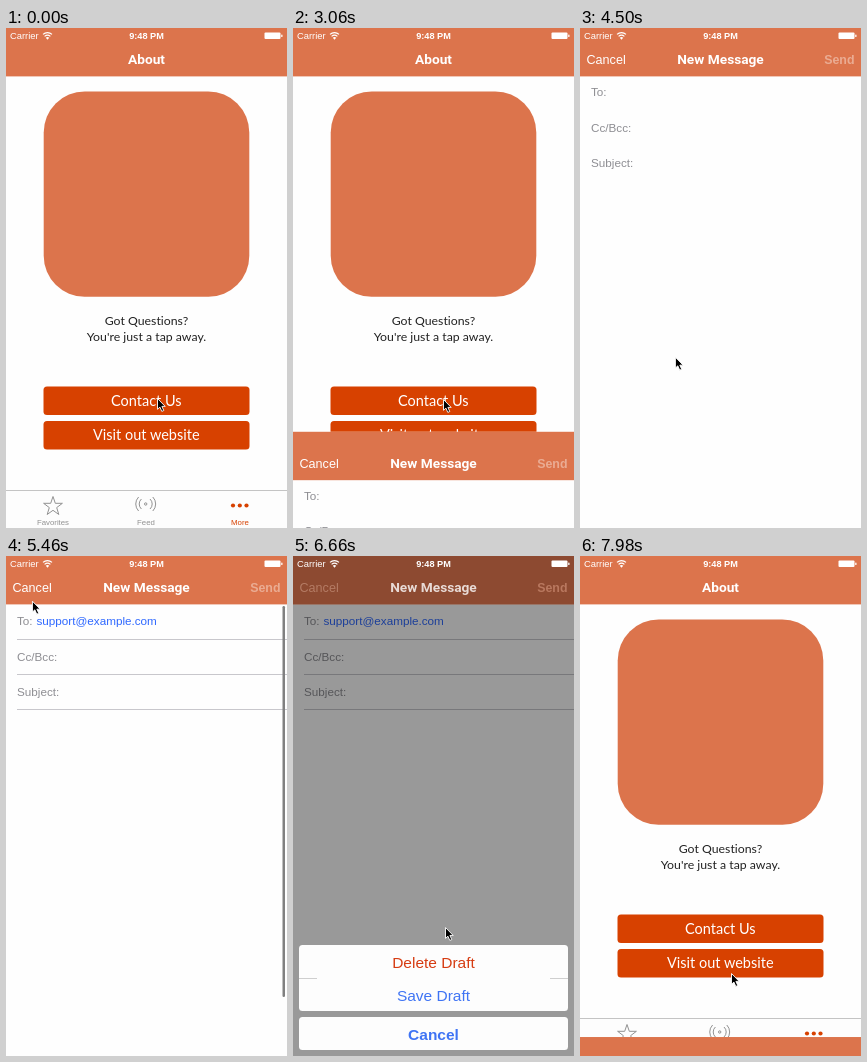
Animation, 281 px wide and 500 px high, one loop 8000 ms. Source, as an HTML page:

```html
<!DOCTYPE html>
<html lang="en">
<head>
<meta charset="utf-8">
<title>About</title>
<style>
html, body { margin: 0; width: 100%; height: 100%; overflow: hidden; background: #fff; }
svg { display: block; width: 100%; height: 100%; }
text { font-family: "Liberation Sans", Arial, sans-serif; font-variant-ligatures: none; }
.mid { text-anchor: middle; }
.title { font: bold 13.7px Roboto, sans-serif; fill: #fff; }
.copy { font: 12.3px Lato, sans-serif; fill: #222; }
.btn { font: 14.5px Lato, sans-serif; fill: #fff; }
.copy, .btn { font-variant-ligatures: none; }
.tab { font-size: 7.8px; fill: #929292; }
.field { font-size: 11.7px; fill: #8e8e93; }
.item { font-size: 15.5px; fill: #3f74f4; }
.icon { fill: none; stroke: #929292; }
</style>
</head>
<body>
<svg viewBox="0 0 281 500">
  <rect width="281" height="500" fill="#fefefe"/>

  <g id="about">
    <rect width="281" height="48.4" fill="#dc744c"/>
    <text class="title mid" x="140.5" y="36">About</text>
    <rect x="37.7" y="63.4" width="205.6" height="205.4" rx="41" fill="#dc744c"/>
    <text class="copy mid" x="140.5" y="297">Got Questions?</text>
    <text class="copy mid" x="140.5" y="313">You're just a tap away.</text>
    <g fill="#d74100">
      <rect x="37.5" y="358.5" width="206" height="28.6" rx="3.5"/>
      <rect x="37.5" y="393" width="206" height="28.6" rx="3.5"/>
    </g>
    <text id="contact" class="btn mid" x="140.3" y="378">Contact Us</text>
    <text class="btn mid" x="140.3" y="412">Visit out website</text>

    <rect y="462" width="281" height="38" fill="#fdfdfd"/>
    <path d="M0 462.5h281" stroke="#c4c4c4"/>
    <path class="icon" d="M47 468.5l2.3 6.8h7.1l-5.7 4.3 2.1 6.9-5.8-4.2-5.8 4.2 2.1-6.9-5.7-4.3h7.1z"/>
    <g class="icon">
      <circle cx="139.7" cy="476" r="1.2"/>
      <path d="M135.4 471a6.8 6.8 0 0 0 0 10M144 471a6.8 6.8 0 0 1 0 10M132.6 469a10 10 0 0 0 0 14M146.8 469a10 10 0 0 1 0 14"/>
    </g>
    <g fill="#d74100">
      <circle cx="227" cy="477.5" r="2.1"/>
      <circle cx="233.8" cy="477.5" r="2.1"/>
      <circle cx="240.5" cy="477.5" r="2.1"/>
    </g>
    <text class="tab mid" x="47" y="497.4">Favorites</text>
    <text class="tab mid" x="140" y="497.4">Feed</text>
    <text class="tab mid" x="234" y="497.4" style="fill:#d74100">More</text>
  </g>

  <g id="mail">
    <rect width="281" height="500" fill="#fefefe"/>
    <g id="fields">
      <text class="field" x="11" y="68">To:</text>
      <text class="field" x="11" y="103.5">Cc/Bcc:</text>
      <text class="field" x="11" y="138.5">Subject:</text>
    </g>
    <g id="loaded">
      <text class="field" x="30.5" y="69" style="fill:#2e68ff">support@example.com</text>
      <path d="M11 83.5h270M11 118.5h270M11 153.5h270" stroke="#c8c7cc"/>
      <rect id="bar" x="276.5" y="50" width="2.5" height="391" rx="1.2" fill="#808080"/>
    </g>
    <rect id="dim" y="48" width="281" height="452"/>
    <rect width="281" height="48.4" fill="#dc744c"/>
    <rect id="navDim" width="281" height="48.4"/>
    <text id="cancel" x="6.5" y="36" font-size="12.6">Cancel</text>
    <text id="title" class="title mid" x="140.5" y="36">New Message</text>
    <text id="send" x="274.5" y="36" font-size="12.4" font-weight="bold" text-anchor="end">Send</text>
  </g>

  <g id="sheet">
    <g fill="#fdfdfd">
      <rect x="6" y="389" width="269" height="66" rx="3.5"/>
      <rect x="6" y="461" width="269" height="33" rx="3.5"/>
    </g>
    <path d="M6 422.5h18M257 422.5h18" stroke="#cfcfcf"/>
    <text class="item mid" x="140.5" y="411.5" style="fill:#d63c12">Delete Draft</text>
    <text class="item mid" x="140.5" y="444.5">Save Draft</text>
    <text class="item mid" x="140.5" y="483.5" font-weight="bold">Cancel</text>
  </g>

  <g id="status" fill="#fff">
    <text x="4" y="11" font-size="9.4">Carrier</text>
    <path d="M41.5 11.8l-1.7-2a2.6 2.6 0 0 1 3.4 0z"/>
    <path d="M38.6 8.4a4.4 4.4 0 0 1 5.8 0M37 6.4a6.8 6.8 0 0 1 9 0" fill="none" stroke="#fff" stroke-width="1.2"/>
    <text class="mid" x="140.5" y="11" font-size="9.2" font-weight="bold">9:48 PM</text>
    <rect x="258.5" y="4.5" width="16" height="6.5" rx="1"/>
    <rect x="275.2" y="6.5" width="1.3" height="2.5" rx=".6"/>
  </g>

  <path id="cursor" d="M.5.5v10.8l2.4-2.2 1.9 4.3 2-.9-1.9-4.1h3.3z" stroke="#fff" stroke-width=".9"/>
</svg>
<script>
const LOOP = 8000;
const el = id => document.getElementById(id);
const set = (id, name, value) => el(id).setAttribute(name, value);
const clamp = v => Math.max(0, Math.min(1, v));
const ramp = (t, from, to) => clamp((t - from) / (to - from));

// Critically damped spring from 0 to 1, starting at a given time
function spring(t, start, rate = 18.26) {
  const x = Math.max(0, t - start) / 1000 * rate;
  return 1 - (1 + x) * Math.exp(-x);
}

// Pointer tip: time, x, y
const path = [
  [0, 151, 370], [110, 151, 370], [120, 150, 370], [590, 150, 370], [600, 150, 371],
  [4070, 150, 371], [4080, 149, 372], [4200, 149, 372], [4500, 95, 329],
  [5040, 49, 182], [5460, 26, 45], [5580, 21, 12], [5700, 22, 32], [6180, 22, 32],
  [6660, 152, 371], [6720, 152, 374], [6780, 151, 386], [6900, 143, 409],
  [7070, 143, 409], [7080, 144, 410], [7500, 144, 410], [7860, 151, 417], [LOOP, 151, 417]
];

function pointer(t) {
  const i = path.findIndex(p => p[0] > t);
  const [a, b] = [path[i - 1], path[i]];
  const k = ramp(t, a[0], b[0]);
  return [1, 2].map(n => a[n] + (b[n] - a[n]) * k);
}

function draw(t) {
  const mail = t < 7703 ? spring(t, 3017) : 1 - spring(t, 7703);
  const sheet = t < 7262 ? spring(t, 6050) : 1 - spring(t, 7262, 20);
  const shown = t >= 6050 && t < 7670;
  const loaded = t >= 5400;

  set("contact", "opacity", t < 780 ? 1 : 0.2 + 0.8 * ramp(t, 840, 1380));

  set("mail", "transform", `translate(0 ${500 * (1 - mail)})`);
  set("fields", "transform", `translate(0 ${loaded ? 1 : 0})`);
  set("loaded", "opacity", loaded ? 1 : 0);
  set("bar", "opacity", 1 - ramp(t, 6250, 6500));
  set("dim", "opacity", 0.4 * sheet);
  set("navDim", "opacity", 0.36 * sheet * sheet);
  set("title", "opacity", 1 - 0.2 * sheet);
  set("cancel", "fill", shown ? "#b47b64" : "#fff");
  set("cancel", "opacity", t < 5940 || t >= 7670 ? 1 : t < 6050 ? 0.2 : ramp(t, 6120, 6420));
  set("send", "fill", shown ? "#b9785f" : "#eaac93");

  set("sheet", "transform", `translate(0 ${111 * (1 - sheet)})`);
  set("cursor", "transform", `translate(${pointer(t)})`);
}

function frame() {
  draw(performance.now() % LOOP);
  requestAnimationFrame(frame);
}
frame();
</script>
</body>
</html>
```
